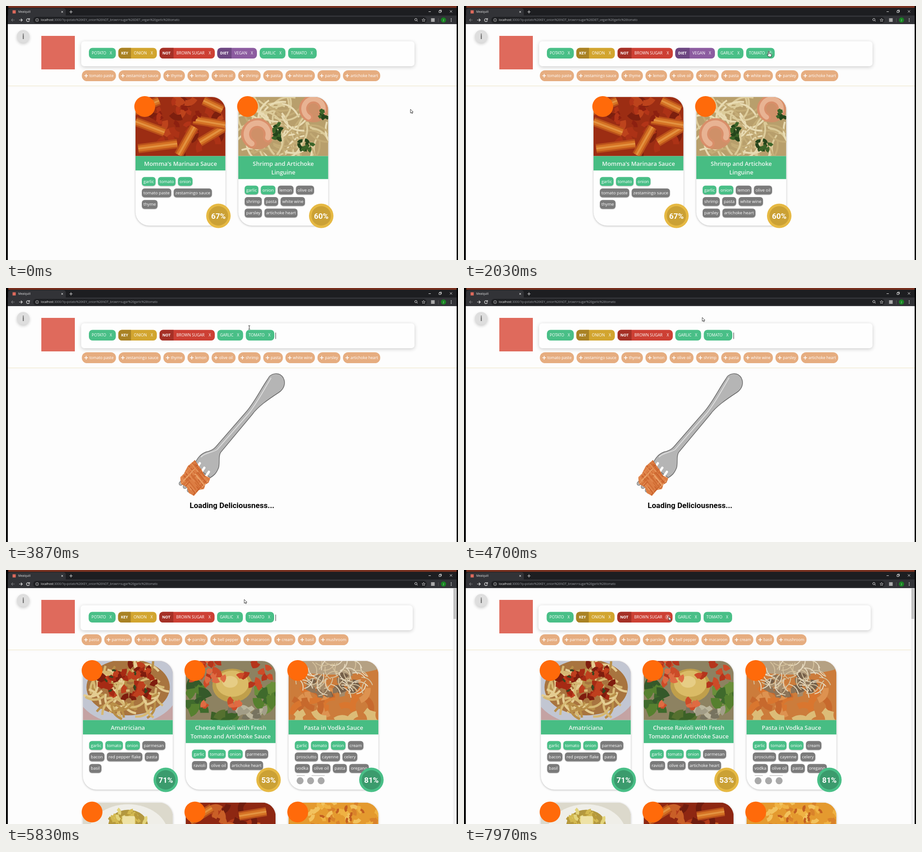
These frames come from a looping animation (998x561 px, 8000 ms). An HTML page with a canvas:

```html
<!DOCTYPE html>
<html lang="en">
<head>
<meta charset="utf-8">
<title>Mealquill</title>
<style>
  html, body { margin: 0; width: 100%; height: 100%; overflow: hidden; background: #000; }
  canvas { display: block; }
</style>
</head>
<body>
<canvas width="998" height="561"></canvas>
<script>
const ctx = document.querySelector('canvas').getContext('2d');
const LOOP = 8000, CLICK = 3430, LOADED = 4950, BLUR = 7800;
const SANS = '"Open Sans", "Noto Sans", sans-serif', ROBOTO = 'Roboto, sans-serif';
const GREEN = '#49bf87', GOLD = '#d2a52f', RED = '#cd4034', PURPLE = '#8c5ca0';
const GRAY = '#7b7b7b', CORAL = '#df6a5c', ORANGE = '#ff6a0a';

// ---- drawing helpers ----
function box(x, y, w, h, r, fill, shadow) {
  ctx.save();
  if (shadow) [ctx.shadowColor, ctx.shadowBlur, ctx.shadowOffsetY] = shadow;
  ctx.fillStyle = fill;
  ctx.beginPath();
  ctx.roundRect(x, y, w, h, r);
  ctx.fill();
  ctx.restore();
}

function disc(x, y, rx, fill, ry = rx, angle = 0) {
  ctx.fillStyle = fill;
  ctx.beginPath();
  ctx.ellipse(x, y, rx, ry, angle, 0, 7);
  ctx.fill();
}

function line(color, width, ...p) {
  ctx.strokeStyle = color;
  ctx.lineWidth = width;
  ctx.beginPath();
  for (let i = 0; i < p.length; i += 2) ctx.lineTo(p[i], p[i + 1]);
  ctx.stroke();
}

function shape(d, fill, stroke, width = 1) {
  const path = new Path2D(d);
  if (fill) { ctx.fillStyle = fill; ctx.fill(path); }
  if (stroke) { ctx.strokeStyle = stroke; ctx.lineWidth = width; ctx.stroke(path); }
}

// y is the vertical middle of the capitals
function text(s, x, y, size, color = '#fff', align = 'left', weight = 400, family = SANS) {
  ctx.font = `${weight} ${size}px ${family}`;
  ctx.textAlign = align;
  ctx.fillStyle = color;
  ctx.fillText(s, x, y + size * 0.36);
  return ctx.measureText(s).width;
}

function random(seed) {
  return () => (seed = (seed * 16807) % 2147483647) / 2147483647;
}

// curved strands strewn over an ellipse
function strands(seed, n, colors, width, length, x, y, rx, ry) {
  const rnd = random(seed * 7919);
  for (let i = 0; i < n; i++) {
    const a = rnd() * 6.28, d = Math.sqrt(rnd()), turn = rnd() * 6.28;
    const dx = Math.cos(turn) * length / 2, dy = Math.sin(turn) * length / 2;
    const cx = x + Math.cos(a) * d * rx, cy = y + Math.sin(a) * d * ry;
    ctx.strokeStyle = colors[i % colors.length];
    ctx.lineWidth = width;
    ctx.beginPath();
    ctx.moveTo(cx - dx, cy - dy);
    ctx.quadraticCurveTo(cx - dy * 0.7, cy + dx * 0.7, cx + dx, cy + dy);
    ctx.stroke();
  }
}

// ---- food pictures, each 199 by 130 ----
const fill = color => box(0, 0, 199, 131, 0, color);

function tube(...p) {
  line('#b9501a', 20, ...p);
  line('#d57224', 13, ...p);
  line('#e39240', 4, ...p);
}

function marinara() {
  fill('#9c2d13');
  strands(5, 22, ['#ac3216', '#7d1f0e', '#bd431c'], 13, 24, 100, 60, 100, 65);
  tube(-5, 32, 52, 8);
  tube(0, 54, 64, 78);
  tube(6, 114, 92, 103);
  tube(95, 128, 130, 66);
  tube(142, 100, 198, 66);
  tube(128, 50, 198, 62);
  tube(150, 8, 192, 28);
  strands(9, 14, ['#b23418', '#8d2010'], 9, 14, 92, 40, 50, 30);
}

function shrimp(x, y, r) {
  disc(x, y, r * 1.35, '#cf9068', r * 1.25);
  ctx.lineCap = 'round';
  for (const [color, width] of [['#d98f6a', 0.8], ['#e8b393', 0.45]]) {
    ctx.strokeStyle = color;
    ctx.lineWidth = r * width;
    ctx.beginPath();
    ctx.arc(x, y, r * 0.9, 2.1, 6.6);
    ctx.stroke();
  }
  ctx.lineCap = 'butt';
}

function parsley(seed, n, x, y, rx, ry) {
  strands(seed, n, ['#24451b', '#3b6428'], 7, 10, x, y, rx, ry);
}

function linguine() {
  fill('#b89f6c');
  strands(12, 90, ['#dccb9a', '#c4ac76', '#e8dbb3'], 4, 60, 100, 65, 110, 75);
  shrimp(42, 82, 27);
  shrimp(166, 26, 24);
  parsley(4, 15, 86, 72, 13, 22);
  parsley(6, 12, 149, 106, 16, 11);
  parsley(8, 7, 190, 38, 10, 13);
}

function amatriciana() {
  fill('#c4a3a3');
  disc(98, 58, 115, '#c2c6d2', 82);
  disc(100, 58, 92, '#a8743f', 62);
  strands(3, 65, ['#d6b974', '#b98f48', '#e4cd92'], 5, 42, 100, 62, 88, 56);
  strands(7, 44, ['#a62a14', '#bf3f1e', '#7f1d0e'], 11, 15, 102, 46, 66, 40);
  strands(2, 9, ['#35451f'], 4, 8, 95, 48, 55, 32);
}

function ravioli() {
  fill('#8d8261');
  strands(16, 12, ['#3f6a2c', '#56802f', '#35592a'], 19, 24, 20, 82, 28, 32);
  strands(17, 12, ['#3f6a2c', '#56802f', '#6a8f3a'], 19, 24, 182, 76, 24, 30);
  strands(19, 8, ['#3c6127', '#55702f'], 17, 22, 82, 122, 30, 10);
  strands(11, 16, ['#a29d87', '#77735f', '#bab59c'], 10, 18, 140, 112, 45, 17);
  disc(103, 54, 44, '#c09f4b', 37);
  disc(103, 50, 36, '#dabb66', 29);
  disc(98, 46, 17, '#e6cd85', 13);
  strands(14, 22, ['#cd4b28', '#b5351c', '#df6b42'], 12, 12, 55, 24, 58, 26);
  strands(15, 15, ['#cd4b28', '#b5351c'], 12, 12, 152, 28, 38, 30);
  strands(18, 8, ['#cd4b28', '#df6b42'], 12, 12, 82, 98, 42, 12);
}

function vodka() {
  fill('#cc7c3b');
  disc(99, 2, 120, '#b5a183', 28);
  strands(21, 22, ['#d9762f', '#c7692d', '#dd9250'], 13, 32, 100, 88, 100, 32);
  strands(22, 26, ['#8d7458', '#75604a', '#a48a6a'], 12, 18, 96, 52, 66, 24);
  strands(23, 60, ['#e6dac0', '#d3c09c'], 2, 30, 100, 36, 88, 36);
  strands(24, 7, ['#dcbc77'], 14, 32, 100, 126, 98, 8);
}

function macaroni() {
  fill('#dcd9cc');
  disc(100, 70, 88, '#efeee8', 66);
  disc(100, 52, 44, '#b2973f', 36);
  strands(31, 50, ['#d3b951', '#b89a3a', '#e3d47c'], 7, 13, 100, 50, 44, 36);
  box(88, 30, 27, 20, 3, '#eee2a6');
}

function penne() {
  fill('#8e2712');
  strands(34, 30, ['#b23b1a', '#701c0e', '#c95f27'], 12, 26, 100, 45, 100, 50);
  tube(10, 42, 58, 12);
  tube(118, 30, 178, 20);
}

function casserole() {
  fill('#e49a2f');
  strands(37, 50, ['#efb243', '#d9822a', '#f2c25e'], 8, 15, 100, 45, 105, 50);
  strands(38, 9, ['#c35f20'], 5, 10, 125, 26, 70, 20);
}

// ---- content ----
const SUGGESTIONS = [
  [[167.5, 'tomato paste'], [248.5, 'zestamingo sauce'], [347.5, 'thyme'], [400.7, 'lemon'], [454, 'olive oil'],
   [512.5, 'shrimp'], [568, 'pasta'], [617, 'white wine'], [687.7, 'parsley'], [744, 'artichoke heart'], [832]],
  [[167, 'pasta'], [217, 'parmesan'], [283.7, 'olive oil'], [343, 'butter'], [395, 'parsley'],
   [451, 'bell pepper'], [524.3, 'macaroon'], [592.3, 'cream'], [644.5, 'basil'], [690.3, 'mushroom'], [762]],
];
const FIXED = [
  { x: 183, w: 59.5, name: 'POTATO', color: GREEN },
  { x: 248, w: 85, name: 'ONION', color: GOLD, label: 'KEY', labelColor: '#a98224', labelW: 28 },
  { x: 339, w: 122, name: 'BROWN SUGAR', color: RED, label: 'NOT', labelColor: '#a53026', labelW: 31 },
];
const VEGAN = { x: 466.5, w: 87.5, name: 'VEGAN', color: PURPLE, label: 'DIET', labelColor: '#6d4781', labelW: 31.5 };
const tail = (garlicX, tomatoX) => [
  { x: garlicX, w: 57, name: 'GARLIC', color: GREEN },
  { x: tomatoX, w: 63, name: 'TOMATO', color: GREEN },
];
const QUERY_BEFORE = [...FIXED, VEGAN, ...tail(560, 623)];
const QUERY_AFTER = [...FIXED, ...tail(466.5, 529.5)];

const BEFORE = [
  { x: 286, y: 201, photo: marinara, title: ["Momma's Marinara Sauce"], percent: 67, matches: 3,
    tags: ['garlic,tomato,onion', 'tomato paste,zestamingo sauce', 'thyme'] },
  { x: 513, y: 201, photo: linguine, title: ['Shrimp and Artichoke', 'Linguine'], percent: 60, matches: 2,
    tags: ['garlic,onion,lemon,olive oil', 'shrimp,pasta,white wine', 'parsley,artichoke heart'] },
];
const AFTER = [
  { x: 169.7, y: 201, photo: amatriciana, title: ['Amatriciana'], percent: 71, matches: 3,
    tags: ['garlic,tomato,onion,parmesan', 'bacon,red pepper flake,pasta', 'basil'] },
  { x: 396.7, y: 201, photo: ravioli, title: ['Cheese Ravioli with Fresh', 'Tomato and Artichoke Sauce'], percent: 53, matches: 3,
    tags: ['garlic,tomato,onion,parmesan', 'ravioli,olive oil,artichoke heart'] },
  { x: 623.8, y: 201, photo: vodka, title: ['Pasta in Vodka Sauce'], percent: 81, matches: 3, more: true,
    tags: ['garlic,tomato,onion,cream', 'prosciutto,cayenne,celery', 'vodka,olive oil,pasta,oregano'] },
  { x: 169.7, y: 513.5, photo: macaroni },
  { x: 396.7, y: 513.5, photo: penne },
  { x: 623.8, y: 513.5, photo: casserole },
];

// ---- page parts ----
function browser(removed) {
  box(0, 0, 998, 561, 0, '#000');
  box(5, 0, 990, 4, 0, '#77301f');
  box(4, 4, 991, 17, 0, '#1d1e21');
  box(4, 21, 991, 19, 0, '#323337');
  box(5, 5, 127, 17, [5, 5, 0, 0], '#323337');
  box(60, 24, 869, 14, 7, '#1f2023');
  box(14.5, 9.5, 7, 7, 0, CORAL);
  text('Mealquill', 27, 13, 6.4, '#e4e4e4');
  shape('M122 11l4 4m0-4l-4 4M140 13h7m-3.5-3.5v7', null, '#ddd');
  shape('M933 12.5h5M956 10.5h4v4h-4zM957.5 10.5v-1.5h4v4h-1.5M980 9.5l5 5m0-5l-5 5', null, '#ddd');
  shape('M19 31h-7m3-3l-3 3l3 3', null, '#77787b', 1.2);
  shape('M29 31h7m-3-3l3 3l-3 3M51 29a3.3 3.3 0 1 0 .7 3M52 27v3h-3', null, '#e6e6e6', 1.2);
  shape('M72 31a3.3 3.3 0 1 1-6.6 0a3.3 3.3 0 1 1 6.6 0M68.7 30.5v2.3M68.7 28.7v.8', null, '#c8c8c8', 0.9);
  const host = text('localhost', 77, 31, 6.6, '#f4f4f4');
  const diet = removed ? '' : '%26DIET_vegan';
  text(`:3000/?q=potato%26KEY_onion%26NOT_brown+sugar${diet}%26garlic%26tomato`, 77 + host, 31, 6.6, '#9b9ea3');
  shape('M907.5 30a2.5 2.5 0 1 1-5 0a2.5 2.5 0 1 1 5 0M907 32l2 2', null, '#ddd');
  shape('M922 27.5l1 2.3 2.5.2-1.9 1.7.6 2.5-2.2-1.4-2.2 1.4.6-2.5-1.9-1.7 2.5-.2z', null, '#ddd', 0.8);
  box(938.5, 27, 8, 8, 0, '#aaa');
  box(954, 27, 1, 9, 0, '#555');
  disc(966, 31, 5.7, '#188522');
  text('J', 966, 31, 6, '#fff', 'center');
  for (const y of [28, 31, 34]) disc(983, y, 0.9, '#ddd');
  box(4, 40, 991, 521, 0, '#fdfdfd');
}

function header(removed, loaded, pointer) {
  box(24, 53, 28, 28, 14, '#dedede', ['#0003', 6, 3]);
  text('i', 38, 67, 16, '#707070', 'center', 700, ROBOTO);
  box(78, 66, 74, 74, 0, CORAL);
  box(4, 176, loaded ? 983 : 991, 1, 0, '#eee5c8', ['#0001', 4, 2]);
  const left = loaded ? 164.5 : 166;
  box(left, 78, loaded ? 733.5 : 736, 55, 7, '#fefefe', ['#0003', 8, 2]);

  const shift = loaded ? -0.5 : 0;
  for (const q of removed ? QUERY_AFTER : QUERY_BEFORE) {
    const x = q.x + shift, right = x + q.w, labelW = q.labelW || 0;
    box(x, 92.5, q.w, 23.5, 8, q.color);
    if (q.label) {
      box(x, 92.5, labelW, 23.5, [8, 0, 0, 8], q.labelColor);
      text(q.label, x + 6.3, 104, 8.4, '#fff', 'left', 700);
    }
    if (Math.hypot(pointer.x - right + 11, pointer.y - 104) < 5) disc(right - 11, 104, 6, '#ffffff33');
    text(q.name, x + labelW + 6.3, 104, 8.6);
    text('X', right - 11, 104, 8.6, '#fff', 'center');
  }

  const chips = SUGGESTIONS[loaded ? 1 : 0];
  chips.slice(0, -1).forEach(([x, name], i) => {
    box(x, 142, chips[i + 1][0] - x - 5.7, 24, 11.5, '#e6ad80');
    shape(`M${x + 5.5} 154h8m-4-4v8`, null, '#fff', 1.6);
    text(name, x + 16.5, 154, 8.6);
  });
}

function recipe(c) {
  const { x, y } = c, w = 198.6, h = 284;
  box(x, y, w, h, 30, '#fefefe', ['#0004', 4, 1]);
  ctx.save();
  ctx.beginPath();
  ctx.roundRect(x, y, w, h, 30);
  ctx.clip();
  ctx.save();
  ctx.beginPath();
  ctx.rect(x, y, w, 130.5);
  ctx.clip();
  ctx.translate(x, y);
  c.photo();
  ctx.restore();
  if (c.title) {
    const extra = (c.title.length - 1) * 19;
    box(x, y + 130.5, w, 31.8 + extra, 0, '#47bd83');
    c.title.forEach((s, i) => text(s, x + w / 2, y + 147.5 + i * 19, 12.9, '#f1f7f3', 'center', 600));
    let left = c.matches;
    c.tags.forEach((row, r) => {
      let tx = x + 14;
      const ty = y + 186.5 + extra + r * 25.3;
      for (const tag of row.split(',')) {
        ctx.font = `400 9.3px ${SANS}`;
        const tw = ctx.measureText(tag).width + 7;
        box(tx, ty - 9.7, tw, 19.5, 6, left-- > 0 ? GREEN : GRAY, ['#0004', 2, 1]);
        text(tag, tx + 3.5, ty, 9.3);
        tx += tw + 5.5;
      }
    });
    if (c.more) {
      line('#aaa', 1, x + 18, y + 253, x + 36, y + 253);
      line('#aaa', 1, x + 51, y + 253, x + 80, y + 253);
      for (const dx of [25.5, 48.7, 72]) disc(x + dx, y + 264.5, 7.7, '#a9a9a9');
    }
  }
  ctx.restore();
  disc(x + 20.3, y + 21, 23, ORANGE);
  if (c.percent) {
    const good = c.percent > 70, px = x + 183, py = y + 262.5;
    disc(px, py, 27, good ? GREEN : '#e6b943');
    disc(px, py, 21.5, good ? '#3b9b6d' : '#cba135');
    text(c.percent + '%', px, py + 0.5, 17, '#fff', 'center', 700, ROBOTO);
  }
}

function loader() {
  ctx.lineCap = 'round';
  for (const [x, y] of [[386, 432], [395, 439], [404, 447]]) {
    line('#666', 9, x + 35, y - 40, x, y);
    line('#b5b5b5', 7, x + 35, y - 40, x, y);
  }
  shape('M578 201C584 188 603 184 612 198C619 211 613 224 602 231C579 246 556 262 544 279' +
    'L474 363C468 371 473 388 469 398C464 410 459 414 451 419L415 392C421 378 428 367 442 362' +
    'C452 360 458 357 463 351L529 275C548 254 562 224 578 201Z', '#b5b5b5', '#6a6a6a', 1.5);
  shape('M585 199C570 224 552 258 535 278L466 357C454 364 439 364 431 373', null, '#ddd', 2);
  for (const [x, y] of [[428, 387], [438, 397], [448, 406]]) line('#fdfdfd', 5, x, y, x - 11, y + 16);

  const noodles = new Path2D('M417 380L424 391L432 402L439 414L451 420L447 430L440 434' +
    'L437 444L426 446L415 459L404 453L399 440L386 432L385 418L393 410L401 394Z');
  ctx.save();
  ctx.fillStyle = '#dc7d43';
  ctx.fill(noodles);
  ctx.clip(noodles);
  const rnd = random(77), tones = ['#e9a066', '#c8602c', '#e28a50', '#d06c33'];
  for (let i = 0; i < 60; i++) {
    const x = 383 + rnd() * 68, y = 385 + rnd() * 70, lean = i % 3 ? 12 : -14;
    line(tones[i % 4], 2, x - lean, y - 15, x + lean, y + 15);
  }
  ctx.restore();
  ctx.lineCap = 'butt';
  text('Loading Deliciousness...', 499, 480, 17, '#050505', 'center', 700, ROBOTO);
}

// ---- pointer ----
const PATH = [[0, 893, 228], [100, 893, 228], [1050, 789, 95], [1400, 789, 95], [2700, 546, 105], [3500, 546, 105],
  [4300, 526, 65], [5950, 526, 65], [6900, 456, 102], [7600, 456, 102], [7900, 452, 103], [8000, 452, 103]];

function pointerAt(t) {
  const i = PATH.findIndex(p => p[0] > t);
  const [t0, x0, y0] = PATH[i - 1], [t1, x1, y1] = PATH[i];
  const u = (t - t0) / (t1 - t0), k = u * u * (3 - 2 * u);
  return { x: x0 + (x1 - x0) * k, y: y0 + (y1 - y0) * k };
}

function pointerKind({ x, y }, chips, blurred) {
  const overChip = y > 92 && y < 116 && chips.some(q => x > q.x && x < q.x + q.w);
  const overSuggestion = y > 142 && y < 166 && x > 167 && x < 826;
  if (blurred) return 'arrow';
  if (overChip || overSuggestion) return 'hand';
  return x > 166 && x < 902 && y > 78 && y < 133 ? 'beam' : 'arrow';
}

function drawPointer({ x, y }, kind) {
  ctx.save();
  ctx.translate(x, y);
  if (kind === 'hand') {
    shape('M-1 .5q1.2-1.2 2 0v4.5l4.5 1.3q1 .5.8 2l-1 4h-5.5l-3.3-4.5q0-1.5 1.5-.8l1 1z', '#fff', '#111', 0.9);
  } else if (kind === 'beam') {
    shape('M-2-4h1.5l.5.5.5-.5h1.5M0-3.5v7M-2 4h1.5l.5-.5.5.5h1.5', null, '#222');
  } else {
    shape('M0 0v8.5l2-1.8 1.3 3 1.5-.7-1.3-2.8h2.6z', '#fff', '#111', 0.8);
  }
  ctx.restore();
}

function draw(t) {
  const removed = t >= CLICK, loaded = t >= LOADED, blurred = t >= BLUR, pointer = pointerAt(t);
  browser(removed);
  header(removed, loaded, pointer);
  if (loaded) {
    AFTER.forEach(recipe);
    box(987, 40, 8, 521, 0, '#f1f1f1');
    box(988, 41, 6, 67, 0, '#c1c1c1');
  } else if (removed) {
    loader();
  } else {
    BEFORE.forEach(recipe);
  }
  if (removed && !blurred && (t + 400) % 1000 < 500) box(595, 98.5, 1, 14, 0, '#333');
  drawPointer(pointer, pointerKind(pointer, removed ? QUERY_AFTER : QUERY_BEFORE, blurred));
}

const start = performance.now();
function frame() {
  draw((performance.now() - start) % LOOP);
  requestAnimationFrame(frame);
}
frame();
</script>
</body>
</html>
```
